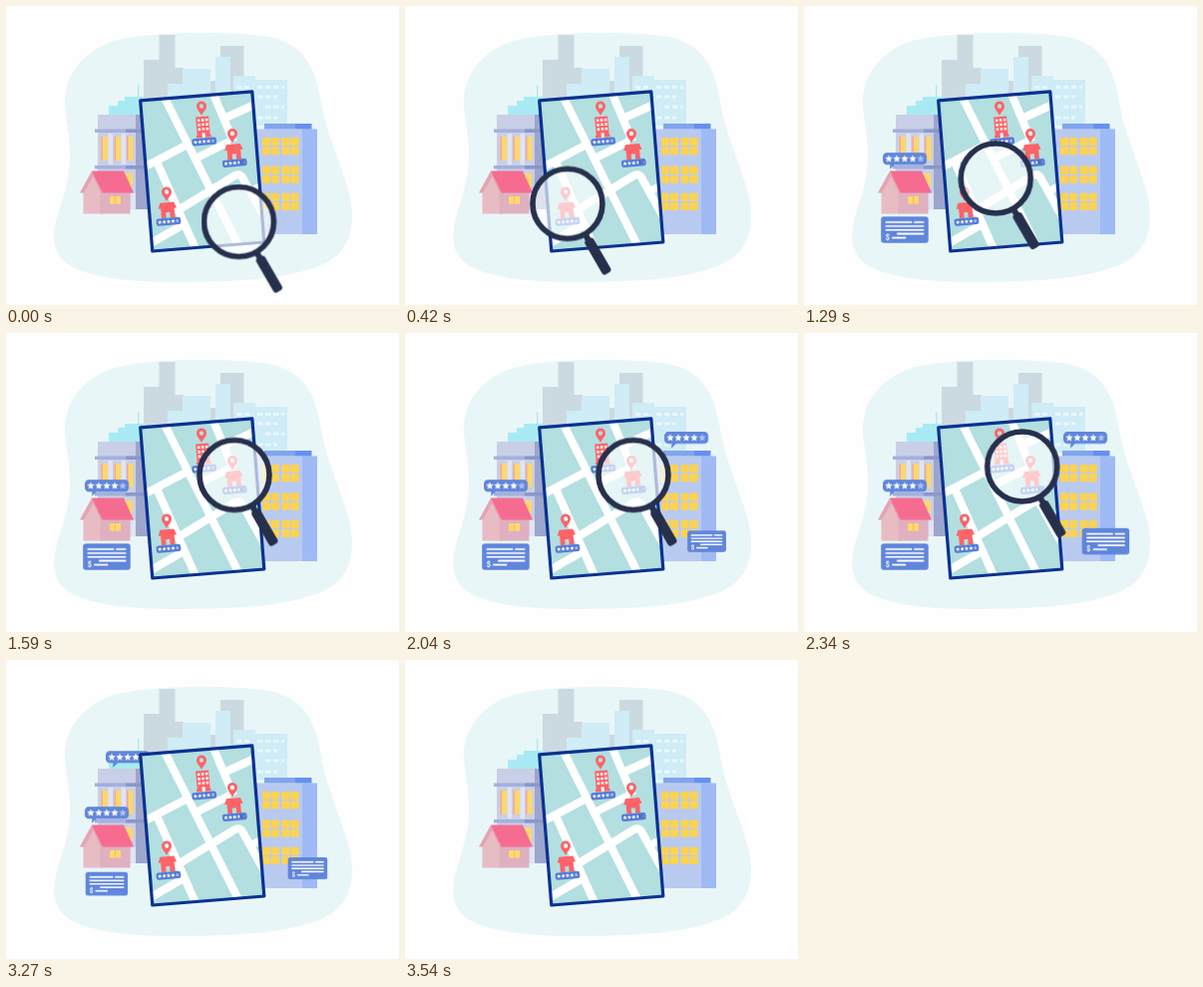
These frames come from a looping animation (394 by 300 pixels, 3570 ms). An HTML page without scripts:

```html
<!DOCTYPE html>
<html lang="en">
<head>
<meta charset="utf-8">
<title>Map search</title>
<style>
html, body { margin: 0; width: 100%; height: 100%; overflow: hidden; background: #fefefe; }
svg { display: block; width: 100vw; height: 100vh; }
.pop { transform-box: fill-box; transform-origin: center; animation: 3570ms linear infinite both; }
.b1 { animation-name: b1; }
.c1 { animation-name: c1; }
.b2 { animation-name: b2; }
.c2 { animation-name: c2; }
.b3 { animation-name: b3; }
.glass { animation: move 3570ms infinite both, leave 3570ms linear infinite both; }

@keyframes move {
  0%, .84% { transform: translate(233.5px, 216.5px); animation-timing-function: cubic-bezier(.42, 0, .35, 1); }
  13.45%, 29.41% { transform: translate(161.8px, 198.1px); animation-timing-function: ease-in-out; }
  43.7%, 59.66% { transform: translate(229px, 142.5px); animation-timing-function: ease-in-out; }
  73.95%, 100% { transform: translate(200px, 118.5px); }
}
@keyframes leave {
  0%, 88.24% { opacity: 1; }
  90.76%, 100% { opacity: 0; }
}
@keyframes b1 {
  0%, 16.81% { transform: scale(0); }
  20.17% { transform: scale(1.12); }
  21.85% { transform: scale(.94); }
  23.53%, 91.6% { transform: scale(1); }
  94.12% { transform: scale(1.1); }
  98.32%, 100% { transform: scale(0); }
}
@keyframes c1 {
  0%, 18.5% { transform: scale(0); }
  21.85% { transform: scale(1.2); }
  23.53% { transform: scale(.85); }
  25.21%, 88.24% { transform: scale(1); }
  89.92% { transform: scale(1.2); }
  91.6% { transform: scale(.9); }
  94.96%, 100% { transform: scale(0); }
}
@keyframes b2 {
  0%, 44.54% { transform: scale(0); }
  48.74% { transform: scale(1.12); }
  50.42% { transform: scale(.94); }
  52.1%, 88.24% { transform: scale(1); }
  89.5% { transform: scale(1.1); }
  91.5%, 100% { transform: scale(0); }
}
@keyframes c2 {
  0%, 49.5% { transform: scale(0); }
  53.78% { transform: scale(1.2); }
  57.14% { transform: scale(.81); }
  58.82%, 88.24% { transform: scale(1); }
  89.92% { transform: scale(1.2); }
  91.6% { transform: scale(.84); }
  94.96%, 100% { transform: scale(0); }
}
@keyframes b3 {
  0%, 81.4% { transform: scale(0); }
  83.19% { transform: scale(1.1); }
  84.03%, 91.6% { transform: scale(1); }
  94.12% { transform: scale(1.1); }
  98.32%, 100% { transform: scale(0); }
}
</style>
</head>
<body>
<svg viewBox="0 0 394 300">
  <defs>
    <path id="star" transform="scale(4)" d="M0-1 .26-.36.95-.31.42.14.59.81 0 .44-.59.81-.42.14-.95-.31-.26-.36Z"/>
    <g id="stars" fill="#fff">
      <use href="#star" x="-16"/>
      <use href="#star" x="-8"/>
      <use href="#star"/>
      <use href="#star" x="8"/>
      <use href="#star" x="16" opacity=".5"/>
    </g>
    <g id="bubble">
      <path fill="#6086dc" d="M4 0H40a4 4 0 0 1 4 4V8a4 4 0 0 1-4 4H12L7 16.5 7.500 12H4A4 4 0 0 1 0 8V4A4 4 0 0 1 4 0Z"/>
      <use href="#stars" x="22" y="6.200"/>
    </g>
    <g id="card">
      <rect width="47.500" height="26.500" rx="3" fill="#6086dc"/>
      <path d="M4.500 5.700H31M33 5.700H43M4.500 9.500H43M4.500 13.300H43M16 17.200H43M11 21.200H25" stroke="#fff" stroke-width="1.700"/>
      <text x="4.500" y="23.500" font-family="Roboto, Arial, sans-serif" font-size="7" font-weight="700" fill="#fff">$</text>
    </g>
    <path id="pin" fill="#ff6368" fill-rule="evenodd" d="M0 9.500C-2 5.500-5 3-5 0A5 5 0 0 1 5 0C5 3 2 5.500 0 9.500ZM0-2.200A2.200 2.200 0 0 0 0 2.200 2.200 2.200 0 0 0 0-2.200Z"/>
    <g id="label">
      <rect x="-12.300" y="-3.600" width="24.600" height="7.200" rx="2.500" fill="#557bd6"/>
      <use href="#stars" transform="scale(.55)"/>
    </g>
    <path id="shop" fill="#ff6368" d="M-7-7.500H7L9.200-1.500H6.800V8H2V2.500H-2V8H-6.800V-1.500H-9.200Z"/>
    <path id="pair" d="M0 0h7.800v8h-7.800zM9 0h7.800v8h-7.800zM0 9.300h7.800v8h-7.800zM9 9.300h7.800v8h-7.800z"/>
    <g id="panes" fill="#ffd34d">
      <use href="#pair" x="257"/>
      <use href="#pair" x="276.700"/>
    </g>
    <clipPath id="sheet"><path d="M134.700 94.800 246.800 85.800 258.800 237 146.800 246Z"/></clipPath>
  </defs>

  <path fill="#e9f6f8" d="M59 100C57 70 78 43 112 34C152 25 218 25 258 30C294 35 309 56 315 91C320 126 336 158 344 188C352 222 344 247 318 259C278 276 226 276 180 277C134 277 93 275 67 262C41 248 47 222 56 196C70 154 62 130 59 100Z"/>

  <!-- skyline -->
  <path fill="#cbdae0" d="M153.500 29H169.500V62H178V100H138V54H153.500ZM215 40H238.500V90H215ZM203 75H212V95H203Z"/>
  <path fill="#cfecf7" d="M177 63H205V95H162V78H177ZM210 51H225V90H210ZM228 70H250V74H282V120H228Z"/>
  <g stroke="#e9f8fc" stroke-width="3" stroke-dasharray="5.500 2.500">
    <path d="M231 81.500H244M252 81.500H279M252 91H272M260 101H279M252 112H272"/>
  </g>
  <path fill="#a8eaf4" d="M103 100H112V95H119V91H132V79H133.300V91H140V112H103Z"/>

  <!-- left office -->
  <path fill="#c9cfe6" d="M92 109H144V204H92Z"/>
  <path fill="#9ca5cd" d="M130 109H144V204H130Z"/>
  <path fill="#e0e4f2" d="M102.500 128H107V159H102.500ZM115.500 128H120V159H115.500ZM124.500 187.500H130V204H124.500Z"/>
  <path fill="#a4b1de" d="M89 123.500H144V127H89ZM89 160H144V163.500H89Z"/>
  <path fill="#8997c9" d="M120 123.500H144V127H120ZM120 160H144V163.500H120Z"/>
  <path fill="#ffd86b" d="M95.500 131H102V155H95.500ZM108.500 131H115V155H108.500ZM121 131H127.500V155H121ZM120.500 168H127V181H120.500Z"/>
  <path fill="#f2a5a8" d="M95.500 131H97V155H95.500ZM108.500 131H110V155H108.500ZM121 131H122.500V155H121Z"/>

  <!-- house -->
  <path fill="#e8bcc3" d="M87 167 97 187V208.500H77.500V187Z"/>
  <path fill="#dfb0c0" d="M94.500 186H124.500V208.500H94.500Z"/>
  <path fill="#e5a3b3" d="M86 165.500 74 187.500H78L87.500 171 95 187.500H99Z"/>
  <path fill="#f66c91" d="M86 165.500H118L128 187.500H97Z"/>
  <path fill="#ffd86b" d="M104 191H115V198.500H104Z"/>
  <path stroke="#edb76c" stroke-width=".8" d="M109.500 191V198.500"/>

  <!-- right office -->
  <path fill="#b9caf0" d="M245 123.500H297V229H245Z"/>
  <path fill="#9fbaf5" d="M297 123.500H312V229H297Z"/>
  <path fill="#82a4ec" d="M259 118H290V123.500H259Z"/>
  <path fill="#6690ee" d="M290 118H306.500V123.500H290Z"/>
  <use href="#panes" y="132"/>
  <use href="#panes" y="160.500"/>
  <use href="#panes" y="187.700"/>

  <g transform="translate(100 91.300)"><use class="pop b3" href="#bubble"/></g>

  <!-- map -->
  <g clip-path="url(#sheet)">
    <path fill="#b3dfe1" d="M130 80H265V250H130Z"/>
    <g fill="none" stroke="#fff" stroke-width="8" stroke-linejoin="round">
      <path d="M155 84 182 138 236 246M130 166 182 139M207 86 228 136M216 114 258 95M190 153 224 136M151 156 192 248"/>
      <path d="M140 241 180 218M174 204 228 171Q234 167 237 172L264 221M243 187 264 177"/>
    </g>
  </g>
  <path fill="none" stroke="#0a3190" stroke-width="3.200" stroke-linejoin="round" d="M134.700 94.800 246.800 85.800 258.800 237 146.800 246Z"/>

  <use href="#pin" x="161" y="186.500"/>
  <use href="#shop" transform="translate(162 204.500) rotate(-5)"/>
  <use href="#label" transform="translate(163 216.300) rotate(-5)"/>
  <use href="#pin" x="196" y="100.500"/>
  <g transform="translate(197.500 121.500) rotate(-5)">
    <path fill="#ff6368" d="M-6.500-10.500H6.500V8H7.300V10.500H-7.300V8H-6.500Z"/>
    <path stroke="#fff" stroke-width="2.500" stroke-dasharray="2.500 1.500" d="M-5-7H5.500M-5-2.500H5.500M-5 2H5.500"/>
    <path fill="#fff" d="M-1.500 6H1.500V10.500H-1.500Z"/>
  </g>
  <use href="#label" transform="translate(198.700 136) rotate(-5)"/>
  <use href="#pin" x="227" y="128"/>
  <use href="#shop" transform="translate(228.500 146) rotate(-5)"/>
  <use href="#label" transform="translate(229.300 157.500) rotate(-5)"/>
  <path stroke="#3e61b8" stroke-width="3.500" opacity=".7" d="M234 157 239 156.600"/>

  <g transform="translate(79 147.200)"><use class="pop b1" href="#bubble"/></g>
  <g transform="translate(77.200 211.300)"><use class="pop c1" href="#card"/></g>
  <g transform="translate(260 99)"><use class="pop b2" href="#bubble"/></g>
  <g transform="translate(278.700 195.800)"><use class="pop c2" href="#card"/></g>

  <g class="glass">
    <g transform="rotate(60)" fill="#26304d">
      <rect x="36" y="-3" width="8" height="6"/>
      <rect x="41" y="-5" width="39.500" height="10" rx="3"/>
    </g>
    <circle r="35" fill="#fff" fill-opacity=".67" stroke="#26304d" stroke-width="5.600"/>
  </g>
</svg>
</body>
</html>
```
